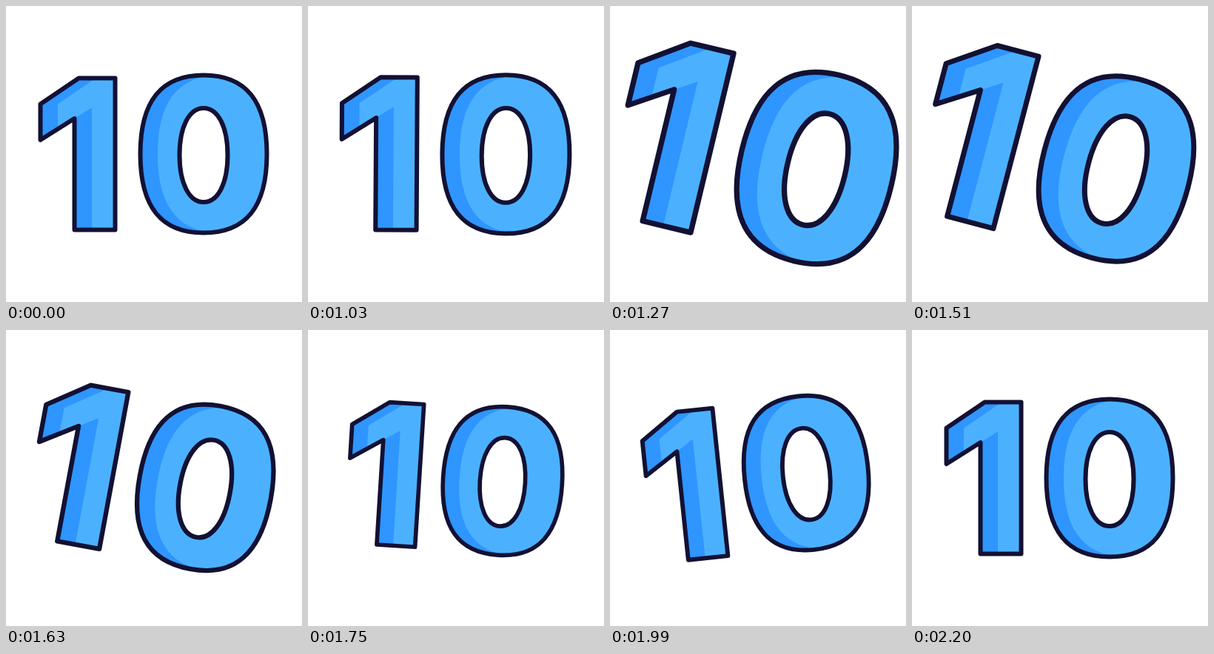
These frames come from a looping animation (400x400 px, 2230 ms). An HTML page:

```html
<!DOCTYPE html>
<html lang="en">
<head>
<meta charset="utf-8">
<title>10</title>
<style>
html, body { margin: 0; width: 100%; height: 100%; overflow: hidden; background: #fff; }
svg { display: block; width: 100%; height: 100%; }
.dark { fill: #2f95ff; }
.light { fill: #4bb1ff; }
.line { fill: none; stroke: #121133; stroke-width: 6; stroke-linejoin: round; }
</style>
</head>
<body>
<svg viewBox="0 0 400 400">
  <defs>
    <path id="one" d="M98.3 97.5H147.5V302.5H92.5V152L46.5 181V132.5Z"/>
    <path id="outer" d="M181.5 200C181.5 128.4 209.5 93.5 267 93.5S352.5 128.4 352.5 200S324.5 306.5 267 306.5S181.5 271.6 181.5 200Z"/>
    <path id="hole" d="M234.5 201.5C234.5 163.4 247.5 138 267 138S299.5 163.4 299.5 201.5S286.5 265 267 265S234.5 239.6 234.5 201.5Z"/>
    <clipPath id="body"><use href="#outer"/></clipPath>
  </defs>
  <g id="ten">
    <use href="#one" class="dark"/>
    <path class="light" d="M121.5 97.5H147.5V302.5H116V137.2L70 166.2V132.5Z"/>
    <use href="#one" class="line"/>
    <use href="#outer" class="dark"/>
    <g clip-path="url(#body)"><use href="#outer" class="light" x="23.5"/></g>
    <use href="#hole" fill="#fff"/>
    <use href="#outer" class="line"/>
    <use href="#hole" class="line"/>
  </g>
</svg>
<script>
const LOOP = 2230, REST = 1030, STEP = 30;
const ten = document.getElementById('ten');

// Keys are [step, value], eased in and out between neighbours.
const turn = [[0, 0], [11.2, 15], [15.8, 15], [33.2, -6], [39.6, 0]];
const size = [[0, 1], [10, 1.22], [13.5, 1.22], [27.4, 0.918], [35.8, 1]];

function at(keys, n) {
  const i = keys.findIndex(k => k[0] > n);
  if (i < 0) return keys[keys.length - 1][1];
  const [n0, v0] = keys[i - 1], [n1, v1] = keys[i];
  const u = (n - n0) / (n1 - n0);
  return v0 + (v1 - v0) * u * u * (3 - 2 * u);
}

function draw() {
  const t = performance.now() % LOOP;
  const n = t < REST ? 0 : Math.floor((t - REST) / STEP) + 1;
  ten.setAttribute('transform',
    `translate(200 200) rotate(${at(turn, n)}) scale(${at(size, n)}) translate(-200 -200)`);
  requestAnimationFrame(draw);
}
draw();
</script>
</body>
</html>
```
